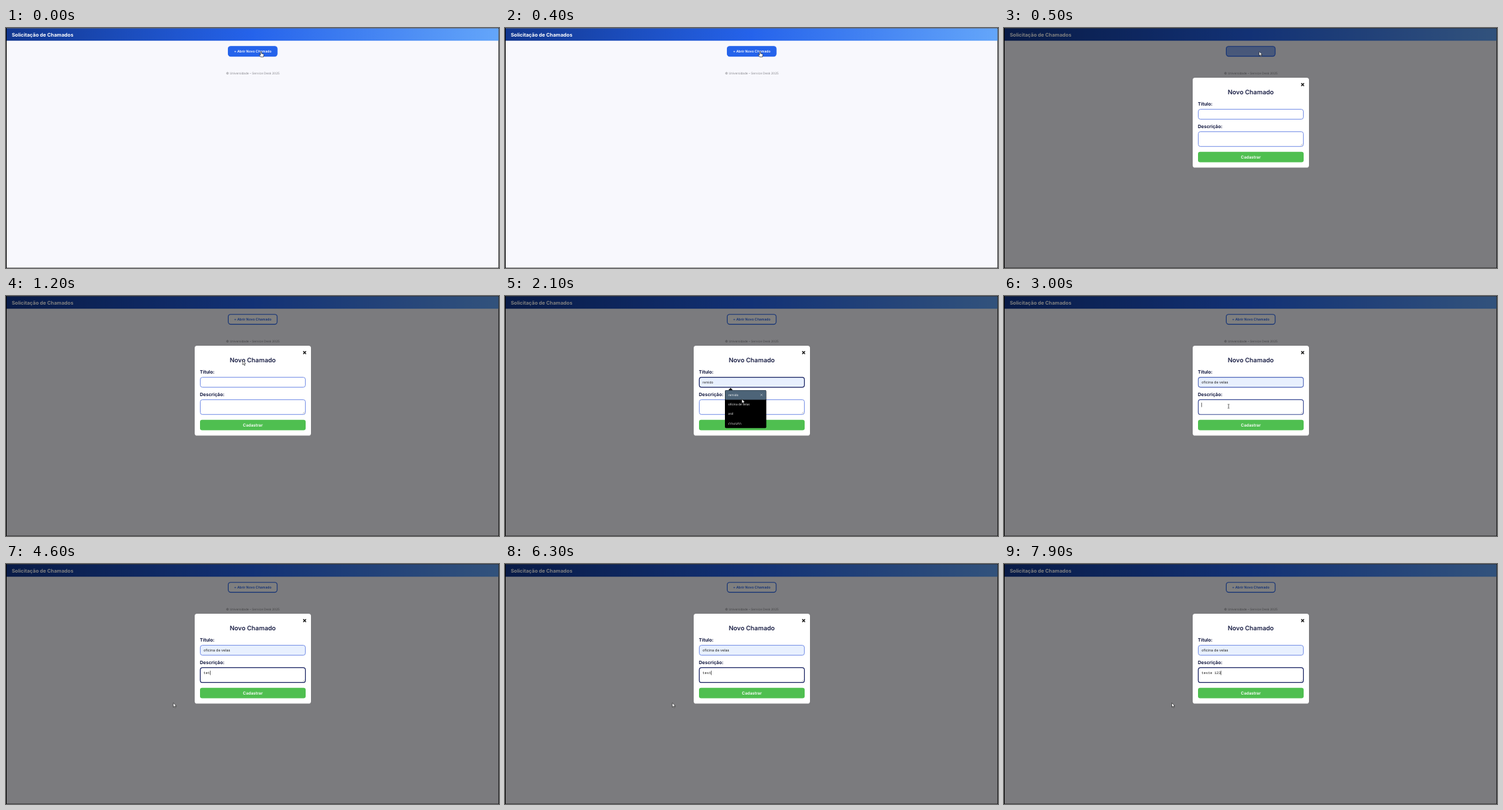
Recreate the animation shown at these times as an HTML page. Size 742 px wide and 362 px high, loop 8 s.

```html
<!DOCTYPE html>
<html lang="pt">
<head>
<meta charset="utf-8">
<title>Solicitação de Chamados</title>
<style>
  html, body { margin: 0; width: 100%; height: 100%; overflow: hidden; background: #000; }
  svg { display: block; width: 100%; height: 100%; }
  text { font-family: Inter, sans-serif; text-rendering: geometricPrecision; white-space: pre; }
  .mid { text-anchor: middle; }
  .label { font-size: 7.03px; font-weight: 700; fill: #141a42; }
  .menu text { font: 4.55px "Open Sans", sans-serif; fill: #fff; }
  .cursor { stroke: #111; stroke-width: .6; stroke-linejoin: round; fill: #fff; }
</style>
</head>
<body>
<svg viewBox="0 0 742 362" preserveAspectRatio="none">
  <defs>
    <linearGradient id="bar">
      <stop offset="0" stop-color="#12378f"/>
      <stop offset=".5" stop-color="#2563eb"/>
      <stop offset="1" stop-color="#64a6fa"/>
    </linearGradient>
  </defs>

  <rect width="742" height="362"/>
  <rect x="1" y=".6" width="740.3" height="361" fill="#f8f8fd"/>
  <rect x="1" y=".6" width="740.3" height="18.6" fill="url(#bar)"/>
  <text x="8.7" y="12.5" font-size="7.5" font-weight="700" fill="#fff">Solicitação de Chamados</text>
  <rect id="open" x="334.5" y="27.7" width="73.6" height="14.9" rx="3.6" stroke="#2563eb" stroke-width="1.1"/>
  <text id="openText" class="mid" x="371.4" y="37" font-size="5.15" font-weight="600">+ Abrir Novo Chamado</text>
  <text class="mid" x="371.5" y="69.8" font-size="4.64" fill="#85858b">© Universidade – Service Desk 2025</text>

  <g id="modal">
    <rect width="742" height="362" fill-opacity=".5"/>
    <rect x="284" y="75" width="175" height="135.5" rx="3.6" fill="#fff"/>
    <path d="M447.4 83.3l4.1 4.1m0-4.1l-4.1 4.1" stroke="#111" stroke-width="1.4"/>
    <text class="mid" x="371.4" y="100.1" font-size="9.37" font-weight="600" fill="#1a1f45">Novo Chamado</text>
    <text class="label" x="291.8" y="117">Título:</text>
    <rect id="title" x="292.4" y="122.6" width="158.2" height="15" rx="3.3"/>
    <text id="titleText" x="297.2" y="132.1" fill="#222"></text>
    <text class="label" x="291.8" y="150.6">Descrição:</text>
    <rect id="area" x="292.4" y="156.4" width="158.2" height="22.3" rx="3.3" fill="#fff"/>
    <path d="M446.6 177.4l2.7-2.7m-1.1 2.7l1.1-1.1" stroke="#777" stroke-width=".4"/>
    <text id="areaText" x="297.2" y="166" style="font:5.4px 'Liberation Mono',monospace" fill="#111"></text>
    <rect id="caret" width=".6" height="6.6" fill="#111"/>
    <rect x="292" y="186.7" width="159" height="15.8" rx="3.2" fill="#4fbf50"/>
    <text class="mid" x="371.5" y="196.8" font-size="6.25" font-weight="600" fill="#fff">Cadastrar</text>
    <g id="menu" class="menu">
      <path d="M335.8 142.5l3.7-4 3.7 4z"/>
      <rect x="331" y="142" width="62.3" height="57.3" rx="1.8"/>
      <rect id="mark" x="331.4" width="61.5" height="14.2" rx="1" fill="#4d6478"/>
      <path d="M384.4 147.6l3.2 3.2m0-3.2l-3.2 3.2" stroke="#dfe5ea" stroke-width=".5"/>
    </g>
  </g>

  <g id="hand" class="cursor">
    <path d="M-.9 .3q.9-.9 1.6 0v2.6l2.7.7q.8.3.7 1.2l-.7 3.3h-3.9l-2.3-3q-.2-1.1.8-.7l1.1.8z"/>
  </g>
  <g id="arrow" class="cursor"><path d="M0 0v6.3l1.5-1.3 1.1 2.4 1.1-.5-1.1-2.4h2z"/></g>
  <g id="beam"><path d="M-1.3-3h1m.6 0h1M0-2.8v5.6M-1.3 3h1m.6 0h1" stroke="#222" stroke-width=".7" fill="none"/></g>
</svg>

<script>
const LOOP = 8000, STEP = 100;
const OPEN = 500, FOCUS = 1500, HOVER = 1900, PICK = 2500, WRITE = 2900;
const options = ['remido', 'oficina de velas', 'asd', String.raw`c\\\u\zi\\\ `.trim()];

// time, x, y of the pointer tip
const route = [
  [0, 384, 35.6], [900, 384, 35.6], [1400, 341, 131], [1700, 341, 131],
  [1900, 351, 149], [2100, 356.4, 155.6], [2300, 355, 164], [2600, 355, 164],
  [2900, 338, 166.3], [3100, 338, 166.3], [3600, 251.8, 209.5],
  [7700, 251.8, 209.5], [7800, 252.5, 209.5]
];
const typed = [
  [4200, 't'], [4600, 'tet'], [5400, 'te'], [5800, 'tes'], [6300, 'test'],
  [6600, 'teste'], [6900, 'teste '], [7100, 'teste 1'], [7600, 'teste 12'], [7800, 'teste 123']
];

const $ = id => document.getElementById(id);
const show = (id, on) => { $(id).style.display = on ? '' : 'none'; };
const set = (id, attrs) => { for (const k in attrs) $(id).setAttribute(k, attrs[k]); };
const clamp = v => Math.max(0, Math.min(1, v));
const within = (t, a, b) => t >= a && t < b;
const ramp = (t, start, ms) => clamp((t - start) / ms);
const mix = (a, b, p) => `rgb(${a.map((v, i) => Math.round(v + (b[i] - v) * p))})`;

const BLUE = [37, 99, 235], WHITE = [255, 255, 255];
const EDGE = [117, 143, 230], NAVY = [28, 38, 100];

options.forEach((label, i) => {
  const el = document.createElementNS('http://www.w3.org/2000/svg', 'text');
  el.setAttribute('x', 336);
  el.setAttribute('y', 150.8 + i * 14.3);
  el.textContent = label;
  $('menu').append(el);
});

function pointAt(t) {
  const i = route.findIndex(r => r[0] > t);
  if (i < 0) return route[route.length - 1].slice(1);
  const [t0, x0, y0] = route[i - 1], [t1, x1, y1] = route[i];
  const p = (t - t0) / (t1 - t0), e = p * p * (3 - 2 * p);
  return [x0 + (x1 - x0) * e, y0 + (y1 - y0) * e];
}

function field(id, focus) {
  set(id, { stroke: mix(EDGE, NAVY, focus), 'stroke-width': 1 + focus * .2 });
}

function draw(t) {
  const [x, y] = pointAt(t);
  const opened = t >= OPEN, menu = within(t, FOCUS, PICK), picked = t >= PICK;
  const preview = menu && t >= HOVER;
  const row = y > 156.3 ? 1 : 0;

  const fade = ramp(t, OPEN - 100, 200) * opened;
  set('open', { fill: mix(BLUE, WHITE, fade) });
  set('openText', { fill: mix(WHITE, BLUE, fade) });
  show('modal', opened);

  field('title', ramp(t, FOCUS - 100, 200) - ramp(t, WRITE - 100, 300));
  field('area', ramp(t, WRITE - 50, 250));
  set('title', { fill: preview || picked ? '#e8f0fe' : '#fff' });
  set('titleText', { 'font-size': picked ? 5.46 : 5 });
  $('titleText').textContent = picked ? options[1] : preview ? options[row] : '';

  show('menu', menu);
  show('mark', preview);
  set('mark', { y: 142.2 + row * 14.3 });

  const last = typed.filter(k => k[0] <= t).pop();
  const text = last ? last[1] : '';
  $('areaText').textContent = text;
  const writing = t >= WRITE;
  const blink = within(t, 3600, 4100) || within(t, 5000, 5400);
  show('caret', writing ? !blink : within(t, FOCUS, HOVER));
  set('caret', { x: 297.3 + text.length * 3.24, y: writing ? 160.9 : 127 });

  const overField = opened && x > 292 && x < 451 &&
    (within(y, 122, 138) || within(y, 156, 179)) && !menu;
  const kind = !opened ? 'hand' : overField ? 'beam' : 'arrow';
  for (const id of ['hand', 'arrow', 'beam']) show(id, id === kind);
  set(kind, { transform: `translate(${x} ${y})` });
}

const begin = performance.now();
function tick() {
  const t = (performance.now() - begin) % LOOP;
  draw(Math.floor((t + 5) / STEP) * STEP % LOOP);
  requestAnimationFrame(tick);
}
draw(0);
tick();
</script>
</body>
</html>
```
